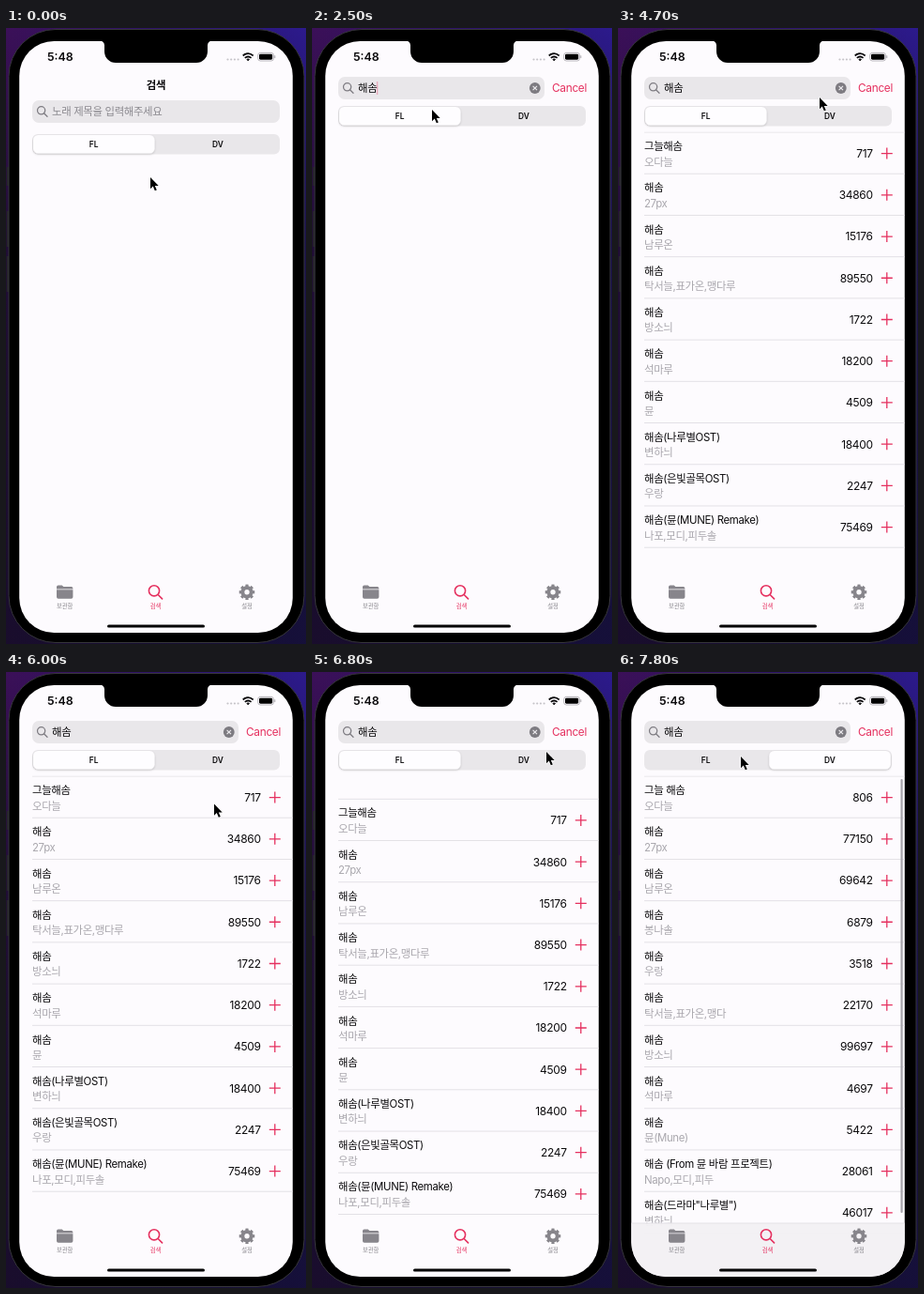
Animation, 320 px wide and 656 px high, one loop 8 s. Source, as an HTML page:

```html
<!DOCTYPE html>
<html lang="ko">
<head>
<meta charset="utf-8">
<title>노래 검색</title>
<style>
html, body { margin: 0; height: 100%; overflow: hidden; background: #110d26; }
svg { display: block; width: 100%; height: 100%; }
text { font: 11.4px Inter, "Noto Sans CJK KR", "Noto Sans CJK", sans-serif; letter-spacing: -.33px; fill: #0b0a0c; white-space: pre; }
.mid { text-anchor: middle; }
.end { text-anchor: end; }
.bold { font-weight: 700; }
.seg { font-size: 8.4px; font-weight: 600; letter-spacing: 0; }
.num { font-size: 12px; }
.soft { fill: #a9a7ad; }
.hint { fill: #8b898f; }
.tab { font-size: 6.3px; letter-spacing: 0; fill: #87858b; }
.red { fill: #e5305f; }
.line { stroke: #e3e1e6; stroke-width: 1; }
.plus { stroke: #e5305f; stroke-width: 1.3; }
</style>
</head>
<body>
<svg viewBox="0 0 320 656" preserveAspectRatio="none">
  <defs>
    <linearGradient id="wall">
      <stop offset="0" stop-color="#3b1058"/>
      <stop offset=".5" stop-color="#2c1266"/>
      <stop offset="1" stop-color="#2c1a8c"/>
    </linearGradient>
    <linearGradient id="dusk" x2="0" y2="1">
      <stop offset="0" stop-color="#0e0c1e" stop-opacity="0"/>
      <stop offset=".35" stop-color="#0e0c1e" stop-opacity=".6"/>
      <stop offset="1" stop-color="#0e0c1e" stop-opacity=".75"/>
    </linearGradient>
    <clipPath id="listClip"><rect x="14" y="110.5" width="292" height="533"/></clipPath>
    <clipPath id="screenClip"><rect x="14.2" y="14" width="291.6" height="630" rx="37"/></clipPath>
    <filter id="shade" x="-10%" y="-30%" width="120%" height="180%">
      <feDropShadow dx="0" dy="1" stdDeviation="1.2" flood-opacity=".2"/>
    </filter>
  </defs>

  <rect width="320" height="656" fill="url(#wall)"/>
  <rect width="320" height="656" fill="url(#dusk)"/>
  <path d="M2 148v20M2 195v38M2 243v38" stroke="#26242b" stroke-width="2.5"/>
  <rect x="3" y="1.5" width="315" height="653" rx="50" stroke="#37363c"/>

  <g clip-path="url(#screenClip)">
    <rect x="14" y="14" width="292" height="630" fill="#fdfbfe"/>
    <g clip-path="url(#listClip)"><g id="list"></g></g>
    <rect id="indicator" x="301.5" y="114" width="2.2" height="462" rx="1.1" fill="#a5a3a9"/>

    <g id="header">
      <rect x="14" y="14" width="292" height="97" fill="#f8f6f9"/>
      <path class="line" d="M14 111H306"/>
    </g>
    <text id="title" class="mid bold" x="160" y="65">검색</text>

    <g id="search">
      <rect id="field" x="28" y="-12" width="264" height="24" rx="7" fill="#e9e7ea"/>
      <g fill="none" stroke="#7f7d83" stroke-width="1.3" stroke-linecap="round">
        <circle cx="37.6" cy="-1.2" r="4.1"/><path d="M40.7 2L44 5.3"/>
      </g>
      <text id="query" x="49" y="4.1"></text>
      <rect id="caret" y="-7" width="1.4" height="14" class="red"/>
      <g id="clear">
        <circle cx="237.8" r="5.9" fill="#7d7b81"/>
        <path d="M235.6-2.2l4.4 4.4m0-4.4l-4.4 4.4" stroke="#efedf0" stroke-width="1.1"/>
      </g>
      <text id="cancel" class="red" y="4" style="font-size:11.9px">Cancel</text>
    </g>

    <g id="segments">
      <rect x="28" width="264" height="21.5" rx="6" fill="#e9e7ea"/>
      <rect id="thumb" y="1" width="129.5" height="19.5" rx="5.3" fill="#fefdff" filter="url(#shade)"/>
      <text class="mid seg" x="93.7" y="14">FL</text>
      <text class="mid seg" x="226" y="14">DV</text>
    </g>

    <g id="tabBack">
      <rect x="14" y="587" width="292" height="57" fill="#f3f1f4" fill-opacity=".96"/>
      <path class="line" d="M14 587H306"/>
    </g>
    <g fill="#87858b">
      <path d="M54 597.4v-2.2q0-1.7 1.7-1.7h4l1.7 1.5h8.2q1.8 0 1.8 1.7v.7z"/>
      <path d="M54 598.2h17.4v7.8q0 1.8-1.8 1.8H55.8q-1.8 0-1.8-1.8z"/>
    </g>
    <g fill="none" stroke="#e5305f" stroke-width="1.6" stroke-linecap="round">
      <circle cx="158" cy="599.3" r="5.6"/><path d="M162.2 603.5l4.4 4.4"/>
    </g>
    <g fill="none" stroke="#87858b">
      <circle cx="257" cy="600.8" r="4.7" stroke-width="4"/>
      <circle cx="257" cy="600.8" r="7" stroke-width="2.6" pathLength="16" stroke-dasharray="1.1 .9" stroke-dashoffset=".55"/>
    </g>
    <text class="mid tab" x="62.6" y="618.3">보관함</text>
    <text class="mid tab red" x="159.6" y="618.3">검색</text>
    <text class="mid tab" x="257" y="618.3">설정</text>
    <rect x="108" y="635.4" width="104" height="3.2" rx="1.6"/>
  </g>

  <path d="M100 13.5a5 5 0 0 1 5 5v6.500a12 12 0 0 0 12 12h86a12 12 0 0 0 12-12v-6.500a5 5 0 0 1 5-5z"/>
  <text x="44" y="35" style="font-size:12.4px;font-weight:600;letter-spacing:0">5:48</text>
  <g fill="#c5c3c8">
    <circle cx="236.5" cy="33.5" r="1.1"/><circle cx="240.2" cy="33.5" r="1.1"/>
    <circle cx="243.9" cy="33.5" r="1.1"/><circle cx="247.6" cy="33.5" r="1.1"/>
  </g>
  <g fill="none" stroke="#0b0a0c" stroke-width="1.7">
    <path d="M252.7 29.5q5.5-4.7 11 0M254.8 31.9q3.4-2.8 6.8 0"/>
    <path d="M258.2 34.9l-1.3-1.5q1.3-1 2.6 0z" stroke-width=".9" fill="#0b0a0c"/>
  </g>
  <rect x="268.7" y="26.4" width="16.8" height="8.6" rx="2.6" fill="none" stroke="#aaa8ae" stroke-width=".8"/>
  <rect x="270" y="27.7" width="14.2" height="6" rx="1.4"/>
  <path d="M286.8 29.3v2.8" stroke="#aaa8ae"/>

  <path id="pointer" d="M0 0V12.2L2.8 9.600 4.800 14.300 6.800 13.400 4.800 8.900H8.700z" stroke="#fff" stroke-width="1.2" paint-order="stroke" stroke-linejoin="round"/>
</svg>

<script>
const $ = id => document.getElementById(id);
const ROW = 44.22, TOP = 111;

const songsA = [
  ["그늘해솜", "오다늘", 717], ["해솜", "27px", 34860], ["해솜", "남루온", 15176],
  ["해솜", "탁서늘,표가온,맹다루", 89550], ["해솜", "방소늬", 1722], ["해솜", "석마루", 18200],
  ["해솜", "뮨", 4509], ["해솜(나루별OST)", "변하늬", 18400],
  ["해솜(은빛골목OST)", "우랑", 2247], ["해솜(뮨(MUNE) Remake)", "나포,모디,피두솔", 75469]
];
const songsB = [
  ["그늘 해솜", "오다늘", 806], ["해솜", "27px", 77150], ["해솜", "남루온", 69642],
  ["해솜", "봉나솔", 6879], ["해솜", "우랑", 3518], ["해솜", "탁서늘,표가온,맹다", 22170],
  ["해솜", "방소늬", 99697], ["해솜", "석마루", 4697], ["해솜", "뮨(Mune)", 5422],
  ["해솜 (From 뮨 바람 프로젝트)", "Napo,모디,피두", 28061],
  ['해솜(드라마"나루별")', "변하늬", 46017]
];

const rowsOf = songs => `<path class="line" d="M28 ${TOP}H306"/>` + songs.map(([name, singer, no], i) =>
  `<g transform="translate(0 ${TOP + i * ROW})">
    <text x="28" y="19.2">${name}</text>
    <text x="28" y="35.6" class="soft">${singer}</text>
    <text x="271.7" y="27" class="end num">${no}</text>
    <path class="plus" d="M280.8 22.6h12M286.8 16.6v12"/>
    <path class="line" d="M28 ${ROW}H306"/>
  </g>`).join("");

const lists = ["", rowsOf(songsA), rowsOf(songsB)];
let shown = 0;

// Time (ms), x, y
const pointerPath = [
  [0, 154, 159], [550, 128, 87], [3500, 128, 87], [4100, 202, 146], [4400, 208, 112],
  [4700, 215, 74], [5100, 237, 59], [5200, 238, 59], [5850, 238, 59], [6150, 206, 222],
  [6400, 208, 204], [6550, 214, 228], [6800, 250, 85], [7000, 230, 88],
  [7450, 228, 90], [7800, 131, 90]
];
// Time (ms), list offset
const scrollPath = [[6000, 0], [6400, -26.5], [6680, 32], [6800, 24.3], [7050, 0]];
const typed = [[1200, "ㅎ"], [1350, "해"], [1500, "햇"], [1700, "해소"], [1900, "해솜"]];
const FOCUS = 660, LOADED = 3400, SUBMIT = 2800, SWITCH = 7100, RELOADED = 7400;

const clamp = v => Math.max(0, Math.min(1, v));
const ease = (t, start, length) => {
  const u = clamp((t - start) / length);
  return u * u * (3 - 2 * u);
};
function along(path, t) {
  const i = path.findIndex(k => k[0] > t);
  if (i < 0) return path[path.length - 1].slice(1);
  if (i === 0) return path[0].slice(1);
  const a = path[i - 1], b = path[i], p = ease(t, a[0], b[0] - a[0]);
  return a.slice(1).map((v, n) => v + (b[n + 1] - v) * p);
}
const set = (id, name, value) => $(id).setAttribute(name, value);
const show = (id, opacity) => set(id, "opacity", +opacity);
const move = (id, x, y) => set(id, "transform", `translate(${x} ${y})`);

function draw(t) {
  const focus = ease(t, FOCUS, 300);
  show("title", 1 - clamp(focus * 1.6));
  move("search", 0, 89 - 25 * focus);
  set("field", "width", 264 - 44 * focus);
  set("cancel", "x", 296 - 40 * focus);
  show("cancel", clamp(focus * 1.3));
  move("segments", 0, 113 - 30 * focus);
  set("thumb", "x", 29 + 132.3 * ease(t, SWITCH, 250));

  const key = typed.filter(k => k[0] <= t).pop();
  const word = key ? key[1] : "";
  $("query").textContent = word || "노래 제목을 입력해주세요";
  set("query", "class", word ? "" : "hint");
  show("clear", !!word);

  // The caret stays solid after each key, then fades in and out.
  const phase = (t - (key ? key[0] : FOCUS)) % 1000;
  const blink = Math.max(clamp((650 - phase) / 150), clamp((phase - 850) / 150));
  show("caret", t > FOCUS && t < SUBMIT ? blink : 0);
  set("caret", "x", 48.5 + word.length * 10.2);

  const state = t < LOADED ? 0 : t < RELOADED ? 1 : 2;
  if (state !== shown) $("list").innerHTML = lists[shown = state];
  const [offset] = along(scrollPath, t);
  move("list", 0, offset);
  show("header", clamp(-offset / 6));
  show("tabBack", state === 2);
  show("indicator", state === 2);

  move("pointer", ...along(pointerPath, t));
}

function tick() {
  draw(Math.floor(performance.now() % 8000 / 100) * 100);
  requestAnimationFrame(tick);
}
tick();
</script>
</body>
</html>
```
